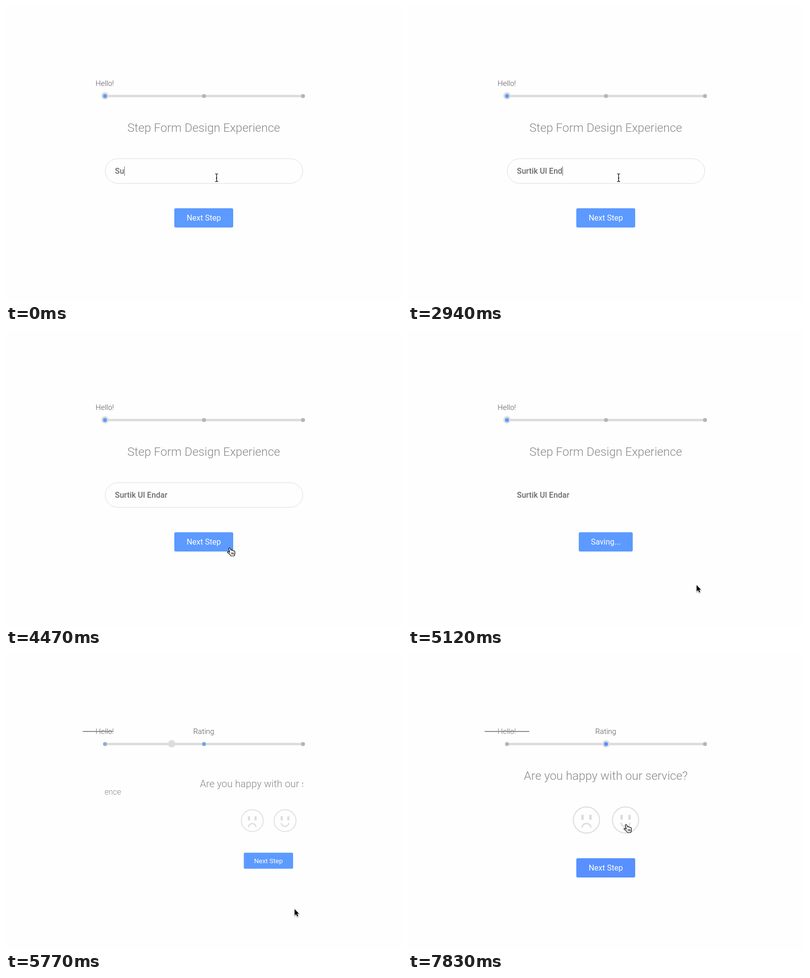
Write an HTML page with a canvas that moves like this. It is 800 px wide and 600 px high and loops after 8 s.

```html
<!DOCTYPE html>
<html lang="en">
<head>
<meta charset="utf-8">
<title>Step form</title>
<style>
html, body { margin: 0; width: 100%; height: 100%; overflow: hidden; background: #fefefe; }
canvas { display: block; }
</style>
</head>
<body>
<canvas id="stage" width="800" height="600"></canvas>
<script>
const c = document.getElementById('stage').getContext('2d');
const LOOP = 8000, SAVE = 4770, LINE = '#ddd';
const NAME = 'Surtik Ul Endar';
const KEYS = [50, 200, 380, 490, 730, 1080, 1680, 1860, 2160, 2640, 2940, 3060, 3240];
// bursts of movement: first step, last step, number of steps
const BURSTS = [[3720, 4120, 8], [4940, 5120, 4], [5660, 5950, 6], [7440, 7830, 7]];
// pointer path: time, x, y
const PATH = [
  [0, 425, 348], [3719, 425, 348], [3720, 427, 354], [3834, 438, 389], [3948, 449, 421], [4120, 451, 442],
  [4939, 451, 442], [4940, 468, 452], [5060, 563, 506], [5120, 583, 517],
  [7439, 583, 517], [7440, 578, 511], [7635, 495, 410], [7830, 440, 346], [LOOP, 440, 346]
];
const HAND = new Path2D('M-1 1Q0-1 1.5 0Q3 2 3.5 4.5Q5 3 6.5 5Q8 4 9 6Q11 5.5 11.5 8Q12 11 10 16L3.5 16Q1 12-3.5 9Q-4 6.5-1.5 7.5L1 9Z');
const CREASES = new Path2D('M4.5 9L5 13M6.5 9L7 13M8.5 9L8.7 13');
const ARROW = new Path2D('M0 0V13L3 10.3L5.2 15L7.3 14L5.2 9.5H9Z');
const IBEAM = new Path2D('M-3-8Q0-8 0-6Q0-8 3-8M0-6V6M-3 8Q0 8 0 6Q0 8 3 8M-1.5 1H1.5');

const within = (v, a, b) => v >= a && v < b;
const mix = (a, b, p) => a + (b - a) * p;
const blend = (a, b, p) => `rgb(${a.map((v, i) => Math.round(mix(v, b[i], p)))})`;

// The CSS "ease" curve
function ease(x) {
  if (x <= 0) return 0;
  if (x >= 1) return 1;
  let lo = 0, hi = 1, s;
  for (let i = 0; i < 24; i++) {
    s = (lo + hi) / 2;
    const bx = 0.75 * s * (1 - s) + s ** 3;
    if (bx < x) lo = s; else hi = s;
  }
  return 0.3 * s * (1 - s) ** 2 + 3 * s * s * (1 - s) + s ** 3;
}

function snap(t) {
  for (const [a, b, n] of BURSTS) {
    if (!within(t, a, b)) continue;
    const d = (b - a) / (n - 1);
    return a + Math.min(n - 1, Math.floor((t - a + 10) / d)) * d;
  }
  return t;
}

function pointerAt(t) {
  const i = Math.max(1, PATH.findIndex(k => k[0] >= t));
  const [a, x, y] = PATH[i - 1], [b, u, v] = PATH[i];
  const p = (t - a) / (b - a);
  return [mix(x, u, p), mix(y, v, p)];
}

function text(s, x, y, size, weight, color, align = 'center') {
  c.font = `${weight} ${size}px Roboto, sans-serif`;
  c.textAlign = align;
  c.fillStyle = color;
  c.fillText(s, x, y);
}

function disc(x, y, r, color) {
  c.fillStyle = color;
  c.beginPath();
  c.arc(x, y, r, 0, 7);
  c.fill();
}

function box(x, y, w, h, r) {
  c.beginPath();
  c.roundRect(x, y, w, h, r);
}

function button(label, y, w, color) {
  c.fillStyle = color;
  box(399.5 - w / 2, y, w, 39, 3);
  c.fill();
  text(label, 399.5, y + 25, 16, 400, '#fff');
}

function progress(p, blue) {
  const grey = [181, 181, 181];
  c.fillStyle = LINE;
  c.fillRect(200, 180, 400, 5);
  disc(mix(200, 400, p), 182, 7.5, LINE);
  disc(200, 182.5, 4, blend(blue, grey, p));
  disc(400, 182.5, 4, blend(grey, blue, p));
  disc(600, 182.5, 4, blend(grey, grey, 0));
  text('Hello!', 199.5, 162, 15, 300, blend([85, 85, 85], [115, 115, 115], p));
  c.fillStyle = '#8c8c8c';
  c.fillRect(155, 156, 90 * p, 2);
  c.globalAlpha = Math.min(1, p * 1.5);
  text('Rating', 399.5, 162, 15, 300, '#555');
  c.globalAlpha = 1;
}

function nameStep(t, color) {
  text('Step Form Design Experience', 399.5, 255, 24, 300, '#888');
  const saving = t >= SAVE;
  if (!saving) {
    c.strokeStyle = LINE;
    c.lineWidth = 1;
    box(200.5, 309.5, 399, 50, 25);
    c.stroke();
  }
  const typed = NAME.slice(0, 2 + KEYS.filter(k => t >= k).length);
  text(typed, 220, 340, 16, 500, '#6c6c6c', 'left');
  if (!within(t, 1560, 1680) && !within(t, 3720, 4120) && t < 4470) {
    c.fillRect(Math.round(220 + c.measureText(typed).width), 325, 1, 19);
  }
  if (saving) button('Saving...', 410, 109, color);
  else button('Next Step', 410, 119, color);
}

function face(x, happy) {
  c.strokeStyle = c.fillStyle = LINE;
  c.lineWidth = 2;
  c.beginPath();
  c.arc(x, 336.5, 26.5, 0, 7);
  c.stroke();
  c.fillRect(x - 10.5, 326, 5, 10);
  c.fillRect(x + 5.5, 326, 5, 10);
  c.lineWidth = 3;
  c.beginPath();
  c.ellipse(x, happy ? 342 : 352, 9, 8.5, 0, 0, Math.PI, !happy);
  c.stroke();
}

function ratingStep(color) {
  text('Are you happy with our service?', 399.5, 255, 24, 300, '#888');
  face(360.5, false);
  face(439.5, true);
  button('Next Step', 414, 119, color);
}

// Slides a panel sideways while it scales about its centre
function panel(shift, scale, draw) {
  c.save();
  c.beginPath();
  c.rect(200, 200, 400, 300);
  c.clip();
  c.translate(399.5 + shift, 344.5);
  c.scale(scale, scale);
  c.translate(-399.5, -344.5);
  draw();
  c.restore();
}

function pointer(t) {
  const [x, y] = pointerAt(t);
  const onInput = t < SAVE && y < 360;
  const onButton = t < 5500 && within(x, 340, 459) && within(y, 410, 449);
  const onFace = t > 5950 && Math.hypot(x - 439.5, y - 336.5) < 27;
  c.save();
  c.translate(Math.round(x), Math.round(y));
  c.lineJoin = 'round';
  c.lineWidth = 1.2;
  c.strokeStyle = '#000';
  if (onInput) {
    c.translate(0.5, 0);
    c.stroke(IBEAM);
  } else if (onButton || onFace) {
    c.fillStyle = '#fff';
    c.fill(HAND);
    c.stroke(HAND);
    c.lineWidth = 0.9;
    c.stroke(CREASES);
  } else {
    c.shadowColor = 'rgba(0,0,0,.4)';
    c.shadowBlur = 2;
    c.shadowOffsetY = 1;
    c.strokeStyle = '#fff';
    c.lineWidth = 2;
    c.stroke(ARROW);
    c.shadowColor = 'transparent';
    c.fillStyle = '#000';
    c.fill(ARROW);
  }
  c.restore();
}

function draw(now) {
  const t = snap(now % LOOP);
  const p = ease((t - 5654) / 310);
  const blue = t < 7020 ? [92, 154, 255] : [88, 144, 255];
  const color = `rgb(${blue})`;
  c.fillStyle = '#fefefe';
  c.fillRect(0, 0, 800, 600);
  progress(p, blue);
  if (p < 1) panel(-400 * p, 1 - p / 2, () => nameStep(t, color));
  if (p > 0) panel(400 * (1 - p), (1 + p) / 2, () => ratingStep(color));
  pointer(t);
}

let start;
function tick(now) {
  start ??= now;
  draw(now - start);
  requestAnimationFrame(tick);
}
requestAnimationFrame(tick);
</script>
</body>
</html>
```
